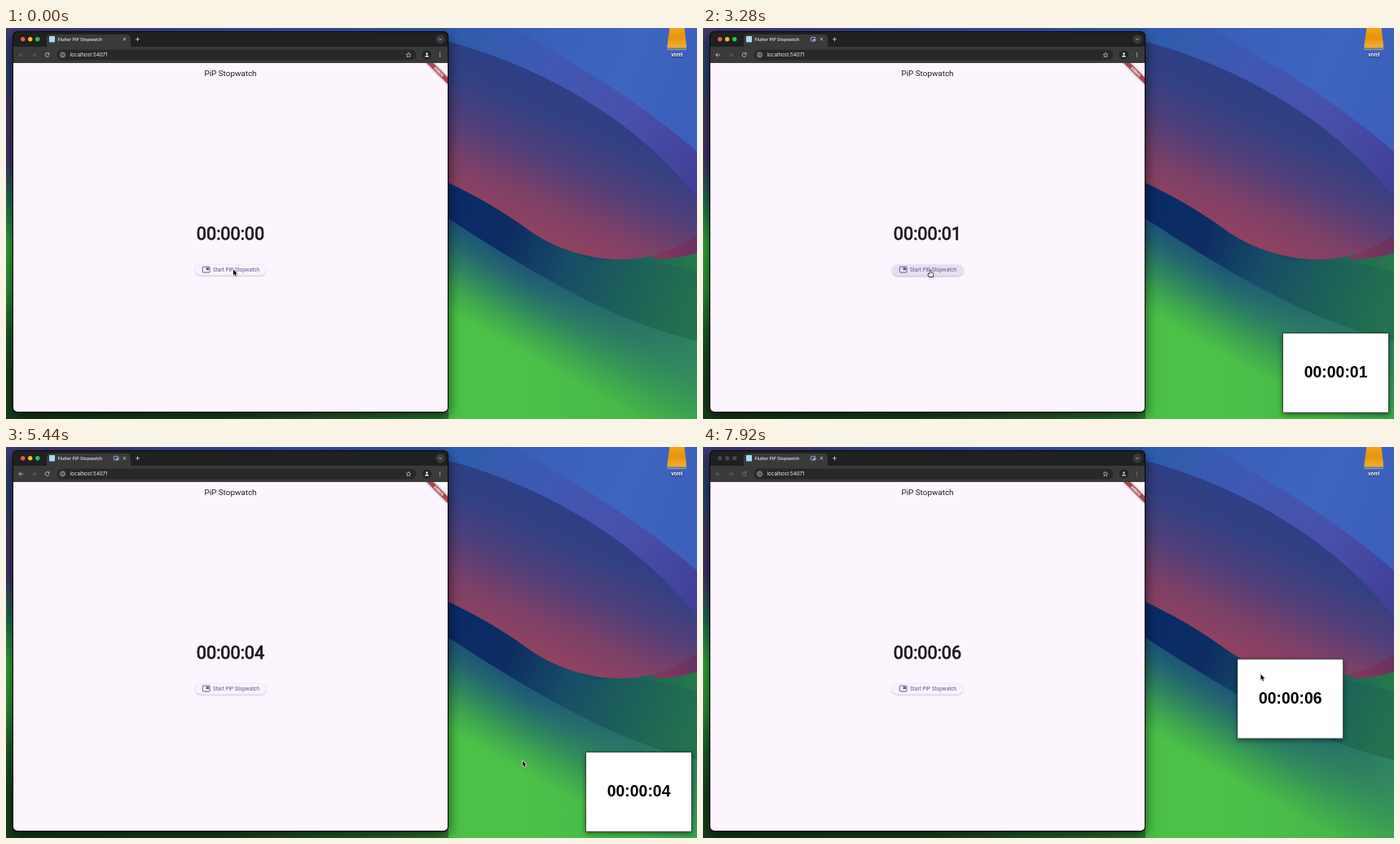
Animation, 848 px wide and 480 px high, one loop 8 s. Source, as an HTML page with a canvas:

```html
<!DOCTYPE html>
<html lang="en">
<head>
<meta charset="utf-8">
<title>PiP Stopwatch</title>
<style>
  html, body { margin: 0; width: 100%; height: 100%; overflow: hidden; background: #0c2f6a; }
  canvas { display: block; width: 848px; height: 480px; }
</style>
</head>
<body>
<canvas id="stage" width="848" height="480"></canvas>
<script>
const W = 848, H = 480, LOOP = 8000;
const OPEN_AT = 1760, PRESS_AT = 1440, DRAG_AT = 7440, DRAG_END = 7860;
const UI = 'Inter, "Open Sans", sans-serif';
const ROBOTO = 'Roboto, sans-serif';
const ARIAL = '"Liberation Sans", Arial, sans-serif';

const stage = document.getElementById('stage').getContext('2d');
let c = stage;

const clamp = v => Math.max(0, Math.min(1, v));
const ease = v => v * v * (3 - 2 * v);
const phase = (t, a, b) => clamp((t - a) / (b - a));

// Cursor stops: time, x, y
const PATH = [
  [0, 279, 296.5], [3600, 279, 297.5], [4240, 406, 323.5], [4800, 406, 323.5],
  [5280, 630, 384], [5840, 650, 390], [6400, 679, 394], [6880, 740, 393],
  [DRAG_AT, 740, 393], [DRAG_END, 684.5, 279], [LOOP, 684.5, 279]
];

function cursorAt(t) {
  let i = 0;
  while (i < PATH.length - 2 && t >= PATH[i + 1][0]) i++;
  const [t0, x0, y0] = PATH[i], [t1, x1, y1] = PATH[i + 1];
  const k = ease(phase(t, t0, t1));
  return { x: x0 + (x1 - x0) * k, y: y0 + (y1 - y0) * k };
}

function box(x, y, w, h, r, fill) {
  c.beginPath();
  c.roundRect(x, y, w, h, r);
  c.fillStyle = fill;
  c.fill();
}

function frame(x, y, w, h, r, color, width) {
  c.beginPath();
  c.roundRect(x, y, w, h, r);
  c.strokeStyle = color;
  c.lineWidth = width;
  c.stroke();
}

function dot(x, y, r, fill) {
  c.beginPath();
  c.arc(x, y, r, 0, 7);
  c.fillStyle = fill;
  c.fill();
}

function draw(d, color, width = 0.8) {
  c.strokeStyle = color;
  c.lineWidth = width;
  c.stroke(new Path2D(d));
}

function text(s, x, y, font, color, align = 'left', spacing = 0) {
  c.font = font;
  c.fillStyle = color;
  c.textAlign = align;
  c.letterSpacing = spacing + 'px';
  c.fillText(s, x, y);
}

function withShadow(color, blur, dy, paint) {
  c.save();
  c.shadowColor = color;
  c.shadowBlur = blur;
  c.shadowOffsetY = dy;
  paint();
  c.restore();
}

function blend(x0, y0, x1, y1, ...colors) {
  const g = c.createLinearGradient(x0, y0, x1, y1);
  colors.forEach((col, i) => g.addColorStop(i / (colors.length - 1), col));
  return g;
}

function shape(d, fill) {
  c.fillStyle = fill;
  c.fill(new Path2D(d));
}

function paintWallpaper() {
  // Green slopes
  shape('M0 0H848V480H0Z',
    blend(652, 290, 601, 380, '#1b4f7a', '#236470', '#2e8460', '#3fa650', '#4bc148'));
  shape('M543 220H848V480H543Z', blend(640, 0, 848, 0, 'rgba(62,168,76,0)', 'rgba(62,168,76,.6)'));
  // Navy valley
  shape('M543 170L848 240V384C770 366 690 330 543 234Z',
    blend(550, 210, 845, 330, '#0a2a68', '#0d2d62', '#174d66', '#1c6059', '#24704f'));
  shape('M650 250L848 255V300C800 284 765 283 720 286Z',
    blend(700, 280, 848, 290, '#12426a', '#1a645c', '#27784a'));
  // Sky bands
  shape('M543 0H848V215L543 30Z', blend(543, 0, 848, 130, '#3158ac', '#3a60ba', '#3e65c0', '#3b5fba'));
  shape('M543 0H622C690 38 780 92 848 152V225L543 60Z',
    blend(560, 10, 848, 190, '#2f5cad', '#4058b2', '#4850ab', '#423f98'));
  // Rose dune
  shape('M790 283C812 272 832 262 848 253V276C832 281 812 285 790 283Z',
    blend(800, 280, 848, 255, '#85365a', '#653264'));
  shape('M543 17C625 38 760 95 848 208V254C826 268 800 282 762 284C715 286 668 268 640 247C606 222 574 205 543 190Z',
    blend(735, 85, 655, 262, '#2c3f86', '#334083', '#4f3f7a', '#7c4068', '#93425f'));
  // Strips around the window
  shape('M0 0H10V480H0Z', blend(0, 0, 0, 480, '#3d3a68', '#24406a', '#45355f', '#3f3268',
    '#1f6e50', '#35a53e', '#2c9038', '#1c5c28', '#153f1c', '#173d1d'));
  shape('M0 0H543V10H0Z', blend(0, 0, 543, 0, '#41396c', '#3a4388', '#374f9c', '#3158ac'));
  shape('M0 470H543V480H0Z', blend(0, 0, 543, 0, '#173d1d', '#1d4a24', '#2f8235'));
}

function paintDrive() {
  shape('M815 -4H832L835 22V25.5Q835 27 833.5 27H813Q811.5 27 811.5 25.5V22Z', '#a39d90');
  shape('M815 -4H832L835 23.5H811.5Z', blend(0, 0, 0, 24, '#f0a31c', '#e8930e', '#f3b02e'));
  draw('M812 25.4H834.5', '#6a665e', 0.9);
  withShadow('rgba(0,0,0,.8)', 2, 0.5, () =>
    text('vorel', 823.3, 35.4, '700 5.8px ' + UI, '#fff', 'center'));
}

function paintRibbon() {
  c.save();
  c.beginPath();
  c.rect(500, 43, 42, 40);
  c.clip();
  c.translate(542, 43);
  c.rotate(Math.PI / 4);
  withShadow('rgba(0,0,0,.5)', 3, 0, () => box(-20, 12.6, 40, 5.5, 0, '#a8474f'));
  text('DEBUG', 0, 17, '900 4.6px ' + ROBOTO, '#fff', 'center');
  c.restore();
}

function paintDesk() {
  paintWallpaper();
  paintDrive();
  withShadow('rgba(0,0,0,.65)', 16, 5, () => box(8, 4, 535, 468.2, 6, '#08080a'));
  box(9, 5, 533, 466, 5.5, '#1f2021');
  box(9, 23, 533, 20.3, 0, '#3a3a3b');
  box(50, 8, 103, 18, 4.5, '#3a3a3b');
  box(9, 43, 533, 428, [0, 0, 5, 5], '#fcf5fe');
  box(62.5, 26.4, 441, 13.2, 6.6, '#272829');
  // Tab
  box(53, 10, 7, 7.4, 0.6, '#a9dcf2');
  text('Flutter PiP Stopwatch', 63.5, 15.6, '500 5.35px ' + UI, '#ececee');
  draw('M143.7 12L147.1 15.4M147.1 12L143.7 15.4', '#dcdcde');
  draw('M159 13.8H164M161.5 11.3V16.3', '#d6d6d8');
  dot(533, 13.8, 5.6, '#3a3a3b');
  draw('M531.4 13L533 14.6L534.6 13', '#dedee0');
  // Address bar
  dot(69.5, 33, 4.6, '#3a3a3b');
  c.beginPath();
  c.arc(69.5, 33, 2.7, 0, 7);
  c.strokeStyle = '#d0d0d2';
  c.lineWidth = 0.7;
  c.stroke();
  draw('M69.5 32.6V34.5M69.5 31.3V32', '#d0d0d2', 0.7);
  text('localhost:54071', 78.5, 35.2, '6.25px ' + UI, '#eeeef0');
  draw('M494 30.2L494.9 32.1L496.9 32.3L495.4 33.7L495.8 35.7L494 34.7L492.2 35.7L492.6 33.7L491.1 32.3L493.1 32.1Z', '#cfcfd1', 0.7);
  dot(516.5, 33, 5.6, '#222324');
  paintRibbon();
  text('PiP Stopwatch', 275.5, 59.3, '9.9px ' + ROBOTO, '#1f1c22', 'center');
}

function paintChrome(t) {
  const active = t < DRAG_AT + 40, open = t >= OPEN_AT;
  const dim = '#69696b', bright = '#d4d4d6';
  const lights = active ? ['#f0564e', '#f5b92f', '#2bc440'] : ['#47484a', '#47484a', '#47484a'];
  lights.forEach((col, i) => dot(20.7 + i * 9, 13.8, 2.7, col));
  draw('M21 33H15.8M18.2 30.6L15.8 33L18.2 35.4', active && open ? bright : dim);
  draw('M31.7 33H36.9M34.5 30.6L36.9 33L34.5 35.4', dim);
  const tone = active ? bright : '#858587';
  draw('M52.6 31.6A2.4 2.4 0 1 0 52.9 33.6M53 30.2V32.1H51.1', tone);
  const face = active ? '#f0f0f2' : '#c0c0c2';
  dot(516.5, 31.6, 1.3, face);
  shape('M513.9 35.6Q514.2 33.4 516.5 33.4Q518.8 33.4 519.1 35.6Z', face);
  for (let i = -1; i < 2; i++) dot(532.5, 33 + i * 2.1, 0.65, tone);
  if (open) {
    frame(132.4, 11.4, 5.6, 4.7, 0.7, '#a9c3f2', 0.8);
    box(135, 13.6, 2.6, 2, 0, '#a9c3f2');
  }
}

function paintTimer(time) {
  text(time, 275.5, 259.8, '21.6px ' + ROBOTO, '#1c1a20', 'center');
  c.strokeStyle = '#1c1a20';
  c.lineWidth = 0.8;
  c.lineJoin = 'round';
  c.strokeText(time, 275.5, 259.8);
}

function paintButton(t) {
  const hover = phase(t, PRESS_AT, PRESS_AT + 120) * (1 - phase(t, 3680, 3840));
  withShadow('rgba(0,0,0,.25)', 1.6 + hover, 0.6 + hover * 0.5, () => box(232, 290.2, 87.3, 13.6, 6.8, '#f7f2fb'));
  if (hover) {
    c.globalAlpha = hover;
    box(232, 290.2, 87.3, 13.6, 6.8, '#e7dff1');
    c.globalAlpha = 1;
  }
  const ink = '#584c80';
  frame(241.3, 293.1, 8.8, 7, 0.8, ink, 0.9);
  box(245.6, 294.4, 3.4, 2.7, 0, ink);
  text('Start PiP Stopwatch', 254, 299, '6.33px ' + ROBOTO, '#65578d', 'left', 0.045);
}

function paintPip(t, time) {
  if (t < OPEN_AT) return;
  const drag = ease(phase(t, DRAG_AT, DRAG_END));
  const veil = phase(t, 6580, 6740) * (1 - phase(t, 7680, 7840));
  c.save();
  c.globalAlpha = phase(t, OPEN_AT, OPEN_AT + 160);
  c.translate(712 - 55.8 * drag, 375 - 114.3 * drag);
  withShadow('rgba(0,0,0,.5)', 6, 2, () => box(-0.6, -0.6, 130.2, 98, 0.8, '#2b2f2e'));
  box(0, 0, 129, 96.8, 0.5, '#fff');
  text(time, 64.6, 53.8, 'bold 19.4px ' + ARIAL, '#000', 'center');
  if (veil) {
    c.globalAlpha = veil;
    box(0, 0, 129, 96.8, 0.5, 'rgba(36,36,38,.82)');
    text('Back to tab', 44.3, 50, '600 5.3px ' + UI, '#fff');
    draw('M81.4 45.8H79.2V50.4H83.8V48.2M82 45.6H84V47.6M84 45.6L81.2 48.4', '#fff', 0.8);
    draw('M120.4 4.9L123.6 8.1M123.6 4.9L120.4 8.1', '#eee', 0.8);
  }
  c.restore();
}

function paintCursor(t, p) {
  const hand = t >= PRESS_AT && t < 3720;
  const d = hand
    ? 'M-.6 .4Q0 -.4 .6 .4V3L3 3.6Q3.8 4 3.6 5L3 7.8H-.9L-2.8 5.2Q-2.6 4.2 -1.6 4.6L-.6 5.2Z'
    : 'M0 0V6.8L1.5 5.5L2.6 8L3.8 7.5L2.7 5H4.8Z';
  const [fill, edge] = hand ? ['#f4f2f6', '#16141a'] : ['#0a0a0a', '#fff'];
  c.save();
  c.translate(p.x, p.y);
  c.lineJoin = 'round';
  withShadow('rgba(0,0,0,.35)', 1.5, 0.5, () => draw(d, edge, 1.3));
  shape(d, fill);
  c.restore();
}

const desk = document.createElement('canvas');
desk.width = W;
desk.height = H;
c = desk.getContext('2d');
paintDesk();
c = stage;

function render(t) {
  const secs = Math.max(0, Math.floor((t - PRESS_AT) / 1000));
  const time = '00:00:' + String(secs).padStart(2, '0');
  c.drawImage(desk, 0, 0);
  paintChrome(t);
  paintTimer(time);
  paintButton(t);
  paintPip(t, time);
  paintCursor(t, cursorAt(t));
}

const start = performance.now();
function tick() {
  render((performance.now() - start) % LOOP);
  requestAnimationFrame(tick);
}
tick();
</script>
</body>
</html>
```
